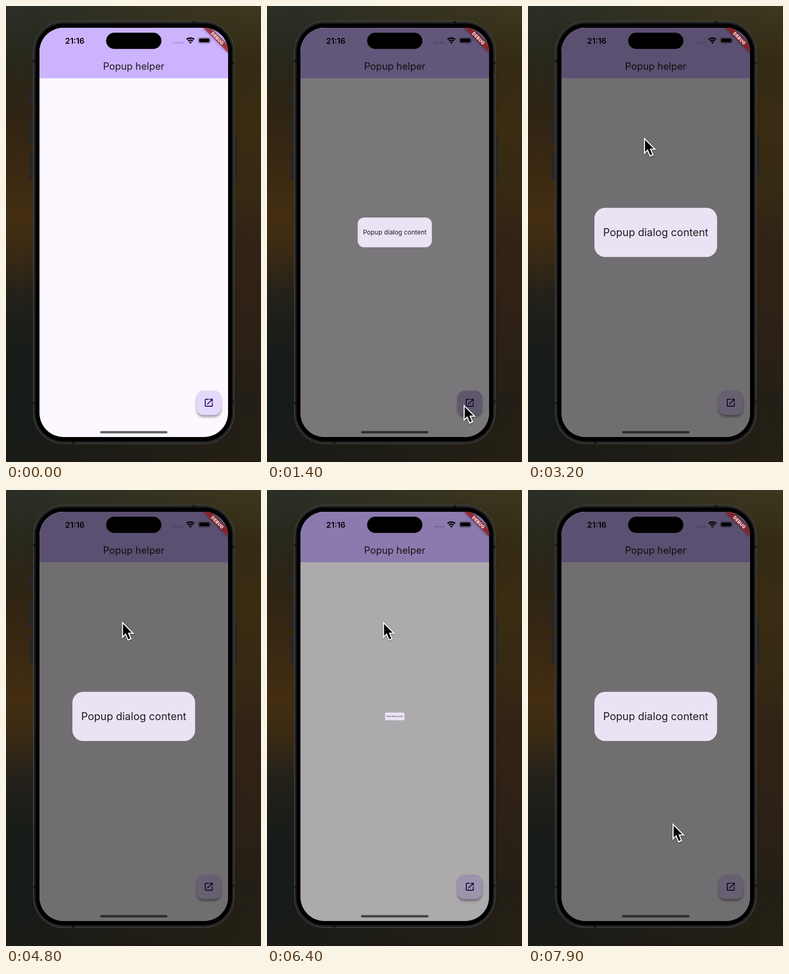
An HTML page for the animation above (8 s loop, 480 by 858 pixels).

```html
<!DOCTYPE html>
<html lang="en">
<head>
<meta charset="utf-8">
<title>Popup helper</title>
<style>
  html, body { margin: 0; width: 100%; height: 100%; overflow: hidden; background: #1c1c17; }
  #wall, #wall::after { position: absolute; inset: 0; }
  #wall {
    background: linear-gradient(#2c2f27, #28271b 12%, #2e2413 23%, #3a2812 35%, #432e12 46%,
      #3a2a13 54%, #24211a 63%, #191c18 74%, #161c19 88%, #1b1b17);
  }
  #wall::after {
    content: "";
    background: linear-gradient(#3c371f, #342b14 12%, #3a2c12 27%, #352913 42%, #302216 52%,
      #302116 63%, #2a2016 75%, #241f16 86%, #252015);
    -webkit-mask: linear-gradient(90deg, #0000 10%, #000 92%);
    mask: linear-gradient(90deg, #0000 10%, #000 92%);
    border-bottom: 1px solid #150804;
    box-sizing: border-box;
  }
  svg { position: absolute; inset: 0; width: 100%; height: 100%; }
  text { font-family: Inter, Roboto, sans-serif; text-anchor: middle; fill: #1d1b20; }
</style>
</head>
<body>
<div id="wall"></div>
<svg viewBox="0 0 480 858">
  <defs>
    <clipPath id="screen"><rect x="63" y="41" width="355" height="770" rx="45.5"/></clipPath>
    <clipPath id="fabShape"><rect x="358.6" y="723.5" width="46.2" height="46.2" rx="13.2"/></clipPath>
    <filter id="soft" x="-50%" y="-100%" width="200%" height="300%"><feGaussianBlur stdDeviation="2.6"/></filter>
  </defs>

  <!-- phone body -->
  <g fill="#27272a">
    <rect x="44" y="159" width="9" height="28" rx="1.5"/>
    <rect x="44" y="208" width="9" height="53" rx="1.5"/>
    <rect x="44" y="275" width="9" height="51" rx="1.5"/>
    <rect x="428" y="243" width="7" height="83" rx="1.5"/>
  </g>
  <rect x="51.5" y="28.5" width="378" height="795" rx="57" fill="#222223" stroke="#505050"/>
  <path d="M351 30.5h5M124 821.5h5M53.5 101v5M427.5 105v5M53.5 745v5M427.5 742v5" stroke="#111" stroke-width="4"/>
  <rect x="55.5" y="33" width="370" height="786" rx="53"/>

  <g clip-path="url(#screen)">
    <!-- app -->
    <rect x="63" y="41" width="355" height="770" fill="#fdf8ff"/>
    <rect x="63" y="41" width="355" height="95" fill="#ccb3fe"/>
    <text x="240.5" y="119.5" font-size="18.3">Popup helper</text>
    <rect x="359" y="728" width="45.5" height="45" rx="13" opacity=".42" filter="url(#soft)"/>
    <g clip-path="url(#fabShape)">
      <rect x="358" y="723" width="48" height="48" fill="#e4d8fb"/>
      <rect id="hover" x="358" y="723" width="48" height="48" fill="#21005d" opacity=".08"/>
      <circle id="ripple" cx="381.5" cy="748" fill="#21005d"/>
    </g>
    <path transform="translate(371.8 736.6) scale(.826)" fill="#21005d"
      d="M19 19H5V5h7V3H5c-1.1 0-2 .9-2 2v14c0 1.1.9 2 2 2h14c1.1 0 2-.9 2-2v-7h-2zM14 3v2h3.6l-9.8 9.8 1.4 1.4L19 6.4V10h2V3z"/>
    <rect id="scrim" x="63" y="41" width="355" height="770"/>

    <g id="popup">
      <rect x="-115.5" y="-46.2" width="231" height="92.4" rx="20" fill="#eae3f4"/>
      <text y="7" font-size="19.7">Popup dialog content</text>
    </g>

    <!-- debug ribbon -->
    <g transform="translate(418 41) rotate(45)">
      <rect x="-33" y="23.1" width="66" height="9.9" opacity=".5" filter="url(#soft)"/>
      <rect x="-33" y="23.1" width="66" height="9.9" fill="#b71c1c" opacity=".63"/>
      <text y="31" font-size="8.2" font-weight="800" letter-spacing=".3" style="fill:#fff">DEBUG</text>
    </g>

    <!-- status bar -->
    <text x="129.5" y="70.5" font-size="15" font-weight="600" style="fill:#000">21:16</text>
    <rect x="188.5" y="50.2" width="104" height="30.6" rx="15.3"/>
    <path d="M317 69h16" stroke="#000" stroke-width="3.3" stroke-linecap="round" stroke-dasharray="0 5" opacity=".22"/>
    <path d="M339.9 63A10.6 10.6 0 0 1 354.3 63M342.6 66A6.6 6.6 0 0 1 351.6 66" fill="none" stroke="#000" stroke-width="2.5"/>
    <path d="M347.1 70.9L344.6 68.2A3.6 3.6 0 0 1 349.6 68.2Z"/>
    <rect x="361.9" y="59.4" width="22.6" height="10.8" rx="3.6" fill="none" stroke="#000" opacity=".42"/>
    <rect x="363.5" y="61" width="19.4" height="7.6" rx="2.2"/>
    <path d="M385.6 62.9q1.6 1.9 0 3.8z" opacity=".45"/>
    <rect x="177" y="799.8" width="127" height="4.4" rx="2.2" opacity=".6"/>
  </g>

  <g id="cursor">
    <g id="outline" fill="#fff">
      <path d="M0 0V32L8.8 23.4 9.6 23.2H23.2Z"/>
      <path d="M18.2 33.4L11 36.4 1.6 14.2 9 11.2Z"/>
    </g>
    <path d="M2 4.8V27.2L8 21.4 8.8 21.2H18.4Z"/>
    <rect x="8.6" y="17.4" width="4" height="16" transform="rotate(-22.8 10.6 25.4)"/>
  </g>
</svg>
<style>
  #outline { filter: drop-shadow(0 1.5px 1.5px #0006); }
</style>
<script>
  const LOOP = 8000, STEP = 100, FADE = 300;
  const $ = id => document.getElementById(id);
  const set = (id, attrs) => {
    for (const k in attrs) $(id).setAttribute(k, attrs[k]);
  };
  const clamp = v => Math.min(1, Math.max(0, v));
  const ramp = (t, start, length) => clamp((t - start) / length);
  const smooth = p => p * p * (3 - 2 * p);

  // time, x, y of the pointer tip
  const path = [
    [300, 20, 715], [900, 370, 749.5], [1700, 370, 749.5], [2500, 218.3, 247.2],
    [6600, 218.3, 247.2], [7300, 380, 743.8], [7600, 380, 743.8], [7900, 272, 626.8]
  ];
  const taps = [1100, 7400];

  function pointer(t) {
    const i = path.findIndex(p => p[0] > t);
    if (i < 0) return path[path.length - 1].slice(1);
    const a = path[Math.max(0, i - 1)], b = path[i];
    const p = smooth(ramp(t, a[0], b[0] - a[0] || 1));
    return [a[1] + (b[1] - a[1]) * p, a[2] + (b[2] - a[2]) * p];
  }

  function draw(t) {
    const open = ramp(t, 1175, FADE) - ramp(t, 6205, FADE) + ramp(t, 7560, FADE);
    set("scrim", { opacity: 0.552 * (1 - (1 - open) ** 2) });
    set("popup", {
      transform: `translate(240.5 426) scale(${open ** 1.75})`,
      visibility: open > 0 ? "visible" : "hidden"
    });

    const [x, y] = pointer(t);
    const shown = t >= path[0][0];
    set("cursor", { transform: `translate(${x} ${y})`, visibility: shown ? "visible" : "hidden" });

    const over = shown && x > 358 && x < 405 && y > 723 && y < 770;
    set("hover", { visibility: over ? "visible" : "hidden" });

    const age = Math.min(...taps.map(s => t >= s ? t - s : Infinity));
    const alive = age < 500;
    set("ripple", { r: alive ? 2 + age * 0.105 : 0, opacity: alive ? 0.12 * (1 - ramp(age, 200, 300)) : 0 });
  }

  const begin = performance.now();
  function frame() {
    const t = (performance.now() - begin) % LOOP;
    draw(Math.floor(t / STEP) * STEP);
    requestAnimationFrame(frame);
  }
  frame();
</script>
</body>
</html>
```
